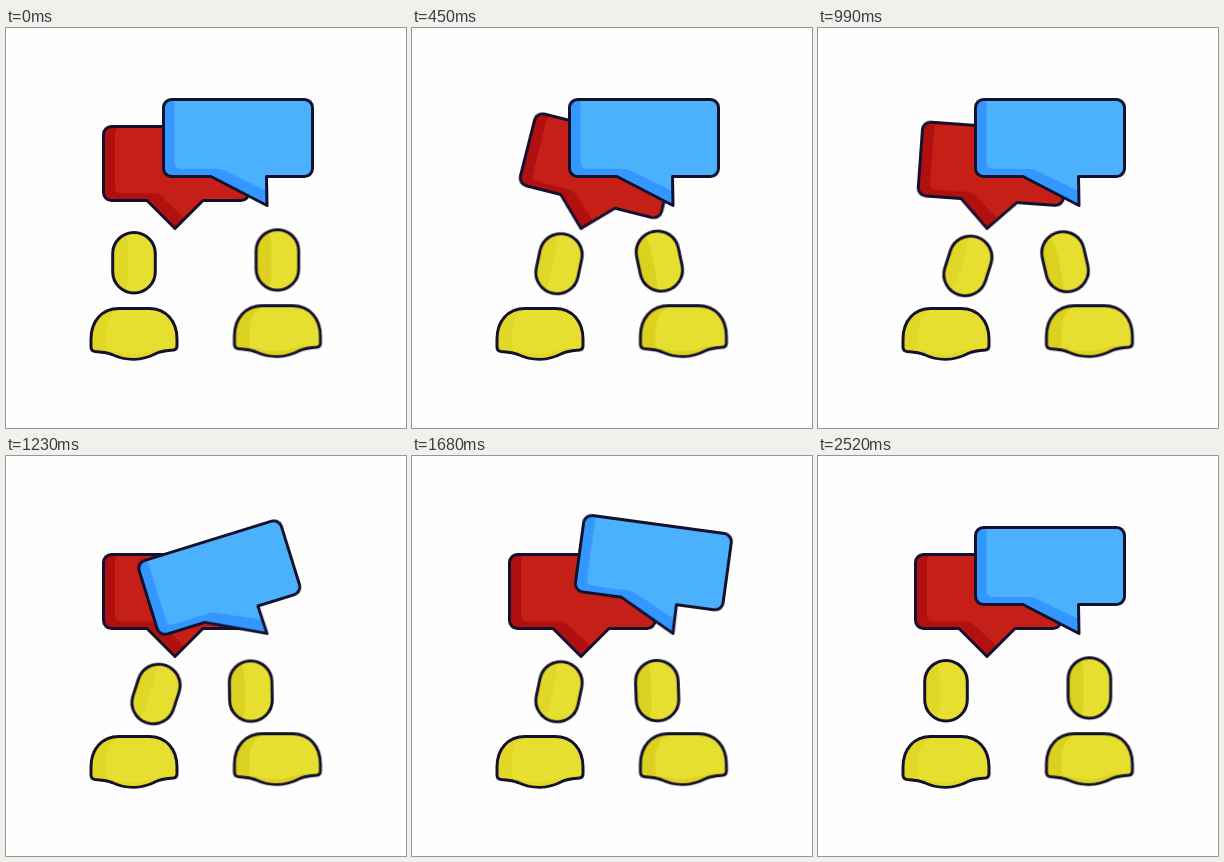
An HTML page for the animation above (4.55 s loop, 400 by 400 pixels).

```html
<!DOCTYPE html>
<html lang="en">
<head>
<meta charset="utf-8">
<title>Two people talking</title>
<style>
html, body { margin: 0; width: 100%; height: 100%; overflow: hidden; background: #fefefe; }
svg { display: block; width: 100%; height: 100%; }

.line { fill: none; stroke: #14112f; stroke-width: 3; stroke-linejoin: round; }
.skin { fill: #e6df2f; }
.shade { fill: var(--shade); }
.left { --shade: #e0d726; }
.right { --shade: #dcd11f; }

.bubble, .person, .head {
  animation: 4550ms cubic-bezier(.37, 0, .63, 1) infinite;
}
.red { transform-origin: 169px 200.5px; animation-name: red; }
.blue { transform-origin: 261px 177.5px; animation-name: blue; }
.person { transform-origin: 128px 331px; }
.head { transform-origin: 128px 234.8px; }
.left .person { animation-name: squash-left; }
.right .person { animation-name: squash-right; }
.left .head { animation-name: lean-left; }
.right .head { animation-name: lean-right; }

/* Bubbles swing on their tips with shrinking amplitude */
@keyframes red {
  0%, 24.18%, 100% { transform: rotate(0deg); }
  4.18% { transform: rotate(-20deg); }
  10.55% { transform: rotate(15deg); }
  15.38% { transform: rotate(-9.5deg); }
  20.88% { transform: rotate(5deg); }
}
@keyframes blue {
  0%, 23.74%, 49.01%, 100% { transform: rotate(0deg); }
  28.13% { transform: rotate(-20deg); }
  34.95% { transform: rotate(15deg); }
  40.44% { transform: rotate(-10deg); }
  46.04% { transform: rotate(5deg); }
}

@keyframes lean-left {
  0%, .66%, 51.43%, 100% { transform: translate(0px, 0px) rotate(0deg); }
  7.25%, 9.89%, 36.26%, 45.05% { transform: translate(19px, 1px) rotate(12deg); }
  23.74%, 27.69% { transform: translate(22px, 3.3px) rotate(18deg); }
}
@keyframes lean-right {
  0%, 1.98%, 46.15%, 100% { transform: translate(0px, 0px) rotate(0deg); }
  8.57%, 9.89% { transform: translate(-24px, 1.2px) rotate(-12deg); }
  16.48%, 23.08% { transform: translate(-24.3px, 1.8px) rotate(-13deg); }
  27.03% { transform: translate(-26.6px, 3.2px) rotate(-1deg); }
  36.92%, 40.66% { transform: translate(-26.2px, 2.7px) rotate(-2deg); }
}

/* Bodies flatten briefly while the head travels */
@keyframes squash-left {
  0%, .66%, 7.25%, 44.62%, 51.43%, 100% { transform: scale(1, 1); }
  3.96%, 47.69% { transform: scale(1.045, .955); }
}
@keyframes squash-right {
  0%, 1.98%, 8.57%, 40.66%, 47.25%, 100% { transform: scale(1, 1); }
  5.27%, 43.74% { transform: scale(1.04, .955); }
}
</style>
</head>
<body>
<svg viewBox="0 0 400 400" role="img" aria-label="Two people talking">
  <defs>
    <path id="red" d="M105.5 98.5H235a8 8 0 0 1 8 8V164.5a8 8 0 0 1-8 8H197L169 200.5L141 172.5H105.5a8 8 0 0 1-8-8V106.5a8 8 0 0 1 8-8Z"/>
    <path id="blue" d="M165.5 71.5H298.5a8 8 0 0 1 8 8V140.5a8 8 0 0 1-8 8H260.5L261 177.5L205 148.5H165.5a8 8 0 0 1-8-8V79.5a8 8 0 0 1 8-8Z"/>
    <rect id="head" x="106.7" y="204.4" width="42.6" height="60.6" rx="21.3" ry="21.3"/>
    <path id="body" d="M85 319V311C85 293 96 280.5 113 280.5H143C160 280.5 171 293 171 311V318Q171 321.5 167.5 322C162 322.5 156 322.5 150 325.5C136 333 120 333 106 326.5C100 324 95 324 89 323.5Q85 323 85 319Z"/>
    <clipPath id="in-body"><use href="#body"/></clipPath>
    <clipPath id="in-head"><use href="#head"/></clipPath>

    <g id="torso">
      <use href="#body" class="shade"/>
      <path class="skin" clip-path="url(#in-body)" d="M118 278C106 283 100 292 100 306V322C108 323 114 326 124 326C138 327 146 321 158 320.5L175 320V278Z"/>
      <use href="#body" class="line"/>
    </g>
    <g id="face">
      <use href="#head" class="shade"/>
      <path class="skin" clip-path="url(#in-head)" d="M117 202Q122 212 122 224V246Q122 258 118 267H152V202Z"/>
      <use href="#head" class="line"/>
    </g>
  </defs>

  <g class="bubble red">
    <use href="#red" fill="#b0100f"/>
    <path fill="#c51f18" d="M116 98.5H235a8 8 0 0 1 8 8V164.5a8 8 0 0 1-8 8H197L179 190.5L154.5 167.5Q152 165.5 149 165.5H115Q109 165.5 109 159V106Q109 98.5 116 98.5Z"/>
    <use href="#red" class="line"/>
  </g>

  <g class="bubble blue">
    <use href="#blue" fill="#3397ff"/>
    <path fill="#4bb1fd" d="M168.5 71.5H298.5a8 8 0 0 1 8 8V140.5a8 8 0 0 1-8 8H260.5V163L217 142Q215 141 212 141H175Q168.5 141 168.5 134Z"/>
    <use href="#blue" class="line"/>
  </g>

  <g class="left">
    <g class="person">
      <use href="#torso"/>
      <g class="head"><use href="#face"/></g>
    </g>
  </g>
  <g class="right" transform="translate(143.4 -2.8)">
    <g class="person">
      <use href="#torso"/>
      <g class="head"><use href="#face"/></g>
    </g>
  </g>
</svg>
</body>
</html>
```
